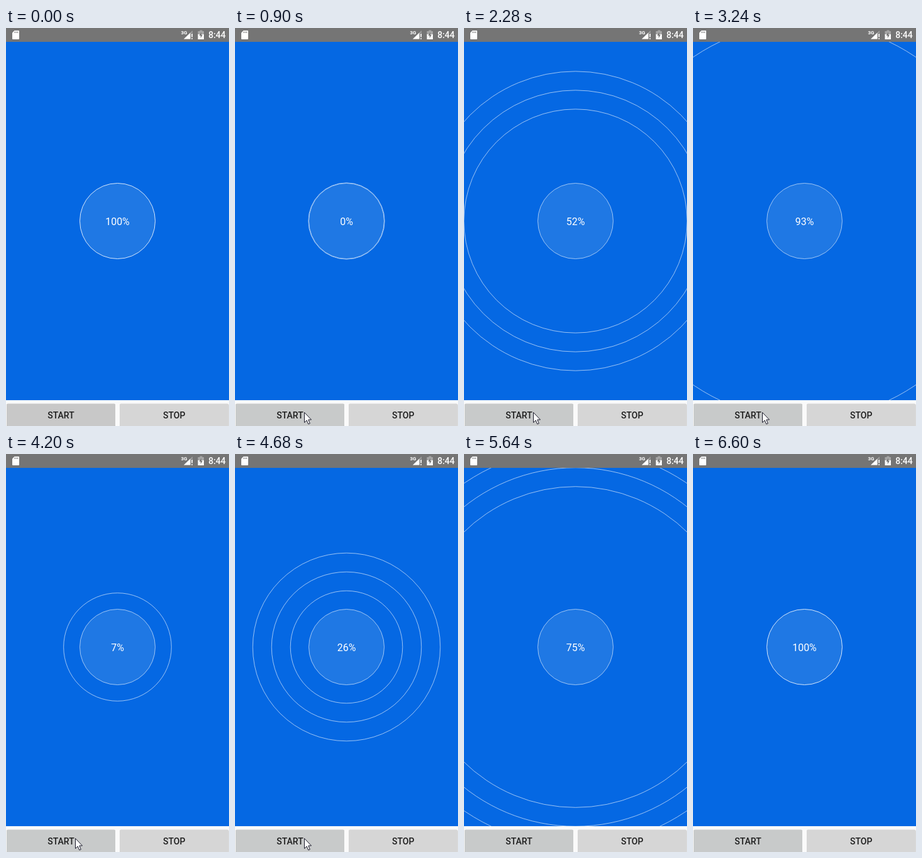
These frames come from a looping animation (355x632 px, 7.32 s). An HTML page:

```html
<!DOCTYPE html>
<html lang="en">
<head>
<meta charset="utf-8">
<title>Ripple progress</title>
<style>
  html, body { margin: 0; width: 100%; height: 100%; overflow: hidden; background: #fafafa; }
  svg { display: block; width: 355px; height: 632px; }
  text { font-family: Roboto, sans-serif; text-anchor: middle; }
  .label { font-size: 14px; font-weight: 500; fill: #1d1d1d; }
  .ring { fill: none; stroke: #fff; stroke-opacity: .6; }
</style>
</head>
<body>
<svg viewBox="0 0 355 632">
  <defs>
    <clipPath id="panel"><rect y="22" width="355" height="569"/></clipPath>
  </defs>

  <rect width="355" height="632" fill="#fafafa"/>
  <rect y="22" width="355" height="569" fill="#0568e3"/>

  <g clip-path="url(#panel)">
    <circle class="ring" cx="177.5" cy="306.5"/>
    <circle class="ring" cx="177.5" cy="306.5"/>
    <circle class="ring" cx="177.5" cy="306.5"/>
    <circle id="disc" cx="177.5" cy="306.5" r="60" fill="#1f78e4" stroke="#fff"/>
    <text id="percent" x="177.5" y="313" font-size="16" fill="#fff"></text>
  </g>

  <!-- status bar -->
  <rect width="355" height="22" fill="#757575"/>
  <g fill="#fff">
    <path d="M13.5 4H20q1 0 1 1V17q0 1-1 1H11q-1 0-1-1V7.5z"/>
    <path d="M14 5.5v2.500M16.300 5.500v2.500M18.600 5.500v2.500" stroke="#757575"/>
    <text x="283.5" y="10" font-size="8" font-weight="700">3G</text>
    <path d="M297 4V8H294V17.500H283z" fill-opacity=".3"/>
    <path d="M293.500 7.500V17.500H283z"/>
    <path d="M295.300 9h1.700v5.500h-1.700zM295.300 16h1.700v1.700h-1.700z"/>
    <path d="M308.500 3.500h4V5H315V11H305.500V5h3z" fill-opacity=".35"/>
    <path d="M305.500 10H315V18H305.500z"/>
    <path d="M311 6.500L307.500 12H309.800V16L313 10.700H311z" fill="#757575"/>
    <text x="336" y="16" font-size="14" font-weight="500">8:44</text>
  </g>

  <!-- buttons -->
  <rect x="1" y="597" width="173" height="37" rx="2" fill="#b4b4b4"/>
  <rect id="start" x="1" y="596.5" width="173" height="36" rx="2"/>
  <rect x="181" y="597" width="173.5" height="37" rx="2" fill="#c4c4c4"/>
  <rect x="181" y="596.5" width="173.5" height="36" rx="2" fill="#d6d6d6"/>
  <text class="label" x="87.5" y="620">START</text>
  <text class="label" x="267.7" y="620">STOP</text>

  <path id="cursor" d="M.5 .5V16.500L4.200 13L6.800 19L9.300 18L6.800 12H11.500z"
        fill="#fff" stroke="#1a1a2a" stroke-linejoin="round"/>
</svg>

<script>
const LOOP = 7320, STEP = 60, START = 840, END = 6600;
const BASE = 60, GAP = 30;
// The innermost ring ends at the panel's corners.
const GROWTH = Math.hypot(355, 569) / 2 + 2 * GAP - BASE;

// [time, cycles completed]
const pace = [[820, 0], [1500, .234], [2280, .519], [3240, .841],
              [4200, 1.179], [5100, 1.4905], [6600, 2]];
// [time, x, y]
const enter = [[60, 333, 159], [300, 235, 385], [540, 140, 575], [720, 110, 610]];
const leave = [[4980, 110, 610], [5100, 145, 598], [5400, 356, 430]];

const $ = id => document.getElementById(id);
const rings = document.querySelectorAll('.ring');
const disc = $('disc'), percent = $('percent'), start = $('start'), cursor = $('cursor');

function along(track, t) {
  const last = track[track.length - 1];
  if (t <= track[0][0]) return track[0].slice(1);
  if (t >= last[0]) return last.slice(1);
  const i = track.findIndex(p => p[0] > t);
  const a = track[i - 1], b = track[i];
  const k = (t - a[0]) / (b[0] - a[0]);
  return a.slice(1).map((v, j) => v + (b[j + 1] - v) * k);
}

function draw(t) {
  const running = t >= START && t < END;
  const cycle = along(pace, t)[0] % 1;
  const p = running ? (1 - Math.cos(Math.PI * cycle)) / 2 : 1;

  percent.textContent = Math.floor(p * 100) + '%';
  disc.setAttribute('stroke-opacity', running ? .58 : .82);
  rings.forEach((ring, i) => {
    const r = BASE + GROWTH * p - GAP * i;
    ring.setAttribute('r', Math.max(r, 0));
    ring.style.display = running && r > BASE ? '' : 'none';
  });

  start.setAttribute('fill', t < 780 ? '#c8c8c8' : '#c8caca');
  const [x, y] = along(t < 3000 ? enter : leave, t);
  cursor.setAttribute('transform', `translate(${Math.round(x)} ${Math.round(y)})`);
  cursor.style.display = t >= 60 && t < 5460 ? '' : 'none';
}

const origin = performance.now();
function tick() {
  const t = (performance.now() - origin) % LOOP;
  draw(Math.floor(t / STEP) * STEP);
  requestAnimationFrame(tick);
}
tick();
</script>
</body>
</html>
```
